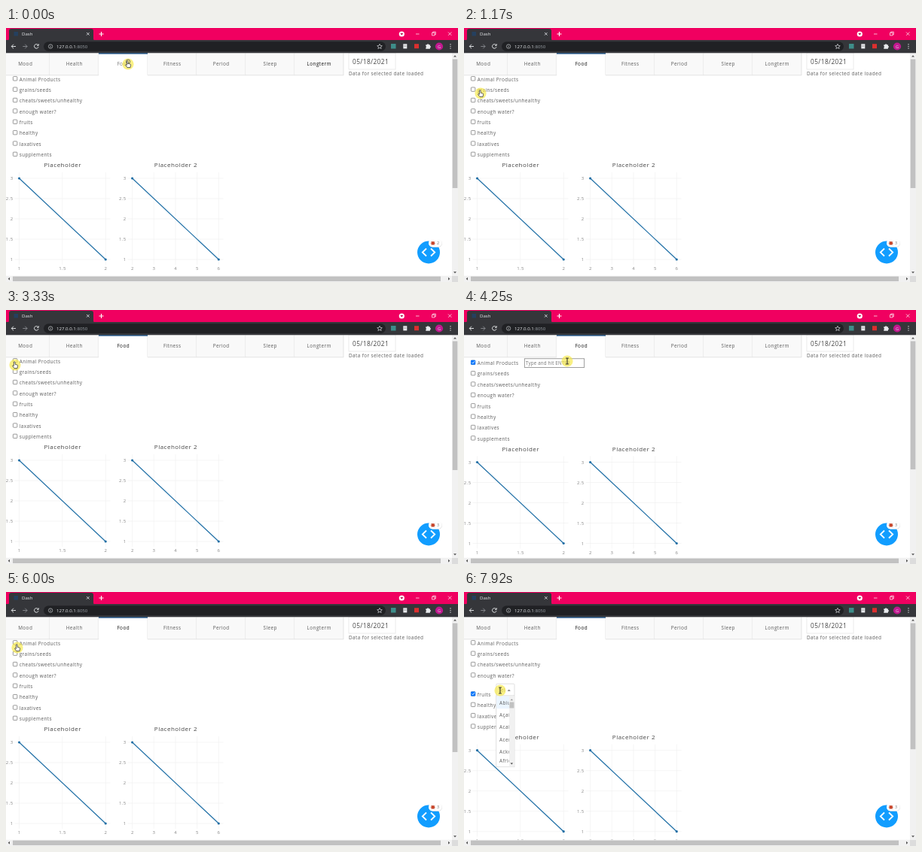
Recreate the animation shown at these times as an HTML page. Size 600 by 338 pixels, loop 8000 ms.

```html
<!DOCTYPE html>
<html lang="en">
<head>
<meta charset="utf-8">
<title>Habit dashboard</title>
<style>
  html, body { margin: 0; width: 100%; height: 100%; overflow: hidden; background: #fff; }
  svg { display: block; width: 100%; height: 100%; }
  text { font-family: "Open Sans", "Noto Sans", sans-serif; white-space: pre; }
  .ui { font-size: 6.4px; letter-spacing: .4px; fill: #5c5c5c; }
  .title { font-size: 8px; letter-spacing: .5px; fill: #444; }
  .tick { font-size: 6px; letter-spacing: .4px; fill: #858585; }
  .chrome { font-size: 6.1px; fill: #e8eaed; }
  .small { font-size: 6.2px; letter-spacing: .17px; fill: #757575; }
  .mid { text-anchor: middle; }
  .end { text-anchor: end; }
</style>
</head>
<body>
<svg id="stage" viewBox="0 0 600 338" xmlns="http://www.w3.org/2000/svg"></svg>
<script>
const LOOP = 8000, STEP = 1000 / 12;
const rowNames = ['Animal Products', 'grains/seeds', 'cheats/sweets/unhealthy', 'enough water?',
  'fruits', 'healthy', 'laxatives', 'supplements'];
const tabNames = ['Mood', 'Health', 'Food', 'Fitness', 'Period', 'Sleep', 'Longterm'];
const fruitNames = ['Abiu', 'Açaí', 'Acai', 'Acerola', 'Ackee', 'African'];

// Moments in ms
const LOADED = 80, MEAT_ON = 3500, HINTS_ON = 4580, HINTS_OFF = 5660, MEAT_OFF = 5915,
  FRUIT_ON = 6915, LIST_ON = 7660;

// Pointer stops: time, x, y
const stops = [
  [0, 162, 48], [580, 162, 48], [1080, 24, 84], [1170, 22, 87], [1480, 11, 160], [1580, 11, 158],
  [1830, 11, 92], [2170, 12, 73], [2420, 12, 72], [2900, 14, 82], [3330, 12, 73], [3580, 12, 72],
  [4080, 137, 68], [5000, 137, 68], [5420, 47, 74], [5750, 15, 74], [6080, 15, 74],
  [6670, 12, 128], [7000, 12, 128], [7500, 48, 131], [8000, 48, 131]
];

const rect = (x, y, w, h, fill, more = '') =>
  `<rect x="${x}" y="${y}" width="${w}" height="${h}" fill="${fill}" ${more}/>`;
const path = (d, stroke, w = 1, more = '') =>
  `<path d="${d}" fill="none" stroke="${stroke}" stroke-width="${w}" ${more}/>`;
const dot = (x, y, r, fill, more = '') => `<circle cx="${x}" cy="${y}" r="${r}" fill="${fill}" ${more}/>`;
const text = (x, y, s, cls, more = '') => `<text x="${x}" y="${y}" class="${cls}" ${more}>${s}</text>`;
const group = (id, body, more = '') => `<g id="${id}" ${more}>${body}</g>`;

function browserTop() {
  return rect(0, 0, 600, 17, '#f00060') +
    `<path d="M1 17Q4 17 4 14V4Q4 1 7 1H113Q116 1 116 4V14Q116 17 119 17Z" fill="#35363a"/>` +
    rect(0, 16, 600, 17.3, '#35363a') +
    rect(10.5, 5, 5.5, 5.5, '#25405f') +
    text(21, 10.2, 'Dash', 'chrome') +
    path('M107 6l3.6 3.6M110.600 6l-3.600 3.600', '#dadce0', .9) +
    path('M126.500 5v6M123.500 8h6', '#fff', 1.1) +
    dot(525.3, 8, 3.6, '#fff') + `<path d="M523.300 7.100h4l-2 2.400z" fill="#b0004a"/>` +
    path('M544 8h4.500M565.500 6.300h3.600v3.600h-3.600zM566.700 6.300v-1.200h3.600v3.600h-1.200M587 5.500l4.400 4.400M591.400 5.500l-4.400 4.400', '#fff', .7) +
    path('M13 24.500H7.300M10 21.700l-2.800 2.800l2.800 2.800', '#f1f3f4', .9) +
    path('M22.300 24.500H28M25.300 21.700l2.800 2.800l-2.800 2.800', '#8b8d91', .9) +
    path('M42.600 22.700A2.800 2.800 0 1 0 43 25.200M43.200 21.200v2.100h-2.100', '#f1f3f4', .9) +
    rect(50, 18.3, 454, 12.6, '#202124', 'rx="6.3"') +
    path('M56.400 24.500a2.700 2.700 0 1 0 5.400 0a2.700 2.700 0 1 0 -5.400 0M59.100 24v2M59.100 22.700v.7', '#c4c7cb', .7) +
    text(67, 26.8, '127.0.0.1<tspan fill="#9aa0a6">:8050</tspan>', 'chrome') +
    path('M496 21.300l1 2.200l2.300 .2l-1.800 1.500l.6 2.300l-2.100 -1.300l-2.100 1.300l.6 -2.300l-1.800 -1.500l2.300 -.2z', '#dadce0', .7) +
    rect(511, 21, 6.5, 6.5, '#3e8e8a') +
    rect(527.3, 21.2, 5, 6.2, '#e8eaed') + path('M528.300 23h3M528.300 24.500h3', '#888', .5) +
    rect(542, 21.2, 6, 6, '#dc2f2f') +
    `<path d="M557.300 22.300h1.700a1.100 1.100 0 0 1 2.200 0h1.700v1.700a1.100 1.100 0 0 1 0 2.200v1.500h-5.600v-1.700a1.100 1.100 0 0 0 0-2z" fill="#e8eaed"/>` +
    dot(575, 24.5, 5.1, '#c2188f') + text(575, 26.5, 'G', 'chrome mid', 'style="font-size:5.6px"') +
    [21.8, 24.4, 27].map(y => dot(590, y, .7, '#dadce0')).join('');
}

function tabs() {
  return tabNames.map((name, i) => {
    const x = 65 * i - 7, on = i === 2;
    return rect(x, 33.3, 65, 29.5, on ? '#fff' : '#f9f9f9') +
      path(`M${x + 65} 33.300V62.800${on ? '' : 'H' + x}`, '#d9d9d9', .7) +
      (on ? rect(x, 33, 65, 1.7, '#2a5f92') : '') +
      text(x + 32.7, 50.3, name, 'ui mid', `id="tab${i}"`);
  }).join('');
}

function box(i) {
  return rect(9.4, -2.8 - .6, 5.4, 5.4, '#fff', 'rx=".8" stroke="#707070" stroke-width=".7"') +
    group('tick' + i, rect(9.1, -3.7, 6, 6, '#0075ff', 'rx=".8"') +
      path('M10.400 -.8l1.300 1.400l2.400 -3', '#fff', .9));
}

const rows = () => rowNames.map((name, i) =>
  group('row' + i, box(i) + text(17.7, 2.6, name, 'ui'))).join('');

// Chart of a falling line; ticks run from first to last along x
function chart(x, name, ticks) {
  const w = 114.7, top = 200, h = 108, gap = w / (ticks.length - 1);
  let s = '';
  ticks.forEach((t, i) => {
    s += path(`M${x + i * gap} 192V315`, '#eee', .6) + text(x + i * gap + .2, 322.3, t, 'tick mid');
  });
  [3, 2.5, 2, 1.5, 1].forEach((v, i) => {
    const y = top + i * h / 4;
    s += path(`M${x - 6} ${y}H${x + 121}`, '#eee', .6) + text(x - 8, y + 2.1, v, 'tick end');
  });
  return s + path(`M${x} ${top}l${w} ${h}`, '#1f6fa6', 1.2) +
    dot(x, top, 1.6, '#1f6fa6') + dot(x + w, top + h, 1.6, '#1f6fa6') +
    text(x + 57.8, 185, name, 'title mid');
}

function dateBox() {
  return rect(455, 33, 62, 22, '#fff', 'stroke="#e2e2e2" stroke-width=".7"') +
    text(460, 47.5, '05/18/2021', 'ui', 'style="font-size:8.3px;fill:#444"') +
    text(455, 62.6, 'Data for selected date loaded', 'ui');
}

function foodInput() {
  return rect(80.3, 64.8, 79.4, 11.8, '#fff', 'stroke="#767676" stroke-width=".7"') +
    text(82, 73, 'Type and hit ENTER', 'small');
}

function hints() {
  return rect(80, 77, 90, 41.3, '#202124', 'rx="1.5"') +
    ['chic', 'chicken'].map((s, i) =>
      text(85.7, 91.7 + 16.6 * i, s, 'chrome', 'style="font-size:5.8px;font-weight:600"')).join('') +
    dot(136.3, 67.3, 2, 'none', 'stroke="#666" stroke-width=".7"');
}

function select() {
  return rect(42.8, 122.2, 24.2, 16, '#fff', 'rx="1.3" stroke="#ccc" stroke-width=".6"') +
    text(45.5, 133, 'Sel', 'small') + group('arrow', '<path d="M57.600 132h4.200l-2.100 -2.400z" fill="#888"/>');
}

function list() {
  const ys = [147, 163.3, 179.7, 196, 212.4, 224.4];
  return rect(42.8, 138, 24.2, 94.8, '#fff', 'stroke="#ccc" stroke-width=".6"') +
    rect(43.1, 138.8, 16.9, 16.4, '#ebf5ff') +
    `<g clip-path="url(#slot)">` +
    ys.map((y, i) => text(47, y + 2.5, fruitNames[i], 'ui')).join('') + '</g>' +
    rect(60, 138.3, 6.7, 94.2, '#f1f1f1') + rect(60.4, 146.5, 6, 8, '#c1c1c1') +
    `<path d="M61.500 144.300h3.600l-1.800 -2z" fill="#999"/><path d="M61.500 227.500h3.600l-1.800 2z" fill="#444"/>`;
}

function bars() {
  return rect(592, 33.3, 8, 304.7, '#f1f1f1') + rect(0, 329.8, 600, 8.2, '#f1f1f1') +
    rect(592.7, 41.5, 6.6, 171.5, '#c1c1c1', 'id="thumb"') + rect(9, 330.6, 568, 6.4, '#c1c1c1') +
    rect(592, 330, 8, 8, '#dcdcdc') +
    `<path d="M594 38.500h4l-2 -2.300zM594 324.300h4l-2 2.300zM5 331.700v4l-2.300 -2zM587 331.700v4l2.300 -2z" fill="#555"/>`;
}

function devButton() {
  return dot(561, 298.5, 15, '#119dff') +
    path('M558 293.500l-5.200 5l5.200 5M564 293.500l5.200 5l-5.200 5', '#fff', 1.8) +
    rect(561.3, 281.5, 17.6, 10.2, '#ddd', 'rx="5"') + rect(561, 281, 17.6, 10.2, '#fff', 'rx="5"') +
    path('M564 284l5.400 4.800M569.400 284l-5.400 4.800M563.500 286.400h6.400', '#a33c22', .5) +
    dot(566.7, 286.4, 2.3, '#c8452a') +
    text(573.6, 288.4, '3', 'small mid', 'id="count" style="font-size:5.4px"');
}

function pointer() {
  const hand = 'M-1.600 -3.200q0 -1 .9 -1t.9 1v2.600l2.600 .6q1 .3 .8 1.400l-.6 3.200h-4l-2.300 -3q-.3 -.9 .7 -.9l1 .8z';
  return dot(0, 0, 7.6, '#f6e94a', 'opacity=".68"') +
    group('hand', `<path d="${hand}" fill="#fff" stroke="#222" stroke-width=".7"/>`) +
    group('beam', path('M-1.800 -4h1.200q.6 0 .6 .6q0 -.6 .6 -.6h1.200M0 -3.500v7M-1.800 4h1.200q.6 0 .6 -.6q0 .6 .6 .6h1.200', '#222', 1)) +
    group('ring', dot(0, -3.3, 2.7, 'none', 'stroke="#555" stroke-width=".8"'));
}

const stage = document.getElementById('stage');
stage.innerHTML =
  '<defs><clipPath id="slot"><rect x="46" y="138" width="13.800" height="90.500"/></clipPath></defs>' +
  rect(0, 0, 600, 338, '#fff') +
  group('charts', chart(17.5, 'Placeholder', [1, 1.5, 2]) + chart(167.6, 'Placeholder 2', [2, 3, 4, 5, 6])) +
  rows() + group('input', foodInput()) + group('hints', hints()) +
  group('select', select()) + group('list', list()) +
  tabs() + dateBox() + devButton() + bars() + browserTop() + group('pointer', pointer());

const $ = id => document.getElementById(id);
const show = (id, on) => $(id).setAttribute('display', on ? 'inline' : 'none');
const move = (id, x, y) => $(id).setAttribute('transform', `translate(${x} ${y})`);
const between = (t, a, b) => t >= a && t < b;

function pointerAt(t) {
  const i = Math.max(1, stops.findIndex(s => s[0] >= t));
  const [t0, x0, y0] = stops[i - 1], [t1, x1, y1] = stops[i];
  const k = (t - t0) / (t1 - t0), e = k * k * (3 - 2 * k);
  return [x0 + (x1 - x0) * e, y0 + (y1 - y0) * e];
}

function render(ms) {
  const t = Math.min(LOOP, Math.floor((ms + 5) / STEP) * STEP + .01);
  const loaded = t >= LOADED, meat = between(t, MEAT_ON, MEAT_OFF), fruit = t >= FRUIT_ON;
  const shift = meat ? 2.5 : fruit ? 10.7 : 0;

  rowNames.forEach((_, i) => {
    move('row' + i, 0, 68 + 14.37 * i + (meat || (fruit && i >= 4) ? shift : 0));
    show('tick' + i, (i === 0 && meat) || (i === 4 && fruit));
  });
  move('charts', 0, shift);
  $('thumb').setAttribute('height', 171.5 - shift * .35);
  show('input', meat);
  show('hints', between(t, HINTS_ON, HINTS_OFF));
  show('select', fruit);
  show('list', t >= LIST_ON);
  $('arrow').setAttribute('transform', t >= LIST_ON ? '' : 'rotate(180 59.700 130.800)');

  $('tab2').style.fill = loaded ? '#111' : '#777';
  $('tab6').style.fill = loaded ? '#5c5c5c' : '#111';
  $('count').textContent = loaded ? '3' : '2';

  const [x, y] = pointerAt(t);
  const beam = (meat && x > 80) || (fruit && x > 43);
  move('pointer', x, y);
  show('beam', beam);
  show('hand', !beam);
  show('ring', t < LOADED || between(t, MEAT_ON, MEAT_ON + 80) || between(t, FRUIT_ON, FRUIT_ON + 80));
}

const start = performance.now();
function tick() {
  render((performance.now() - start) % LOOP);
  requestAnimationFrame(tick);
}
render(0);
requestAnimationFrame(tick);
</script>
</body>
</html>
```
